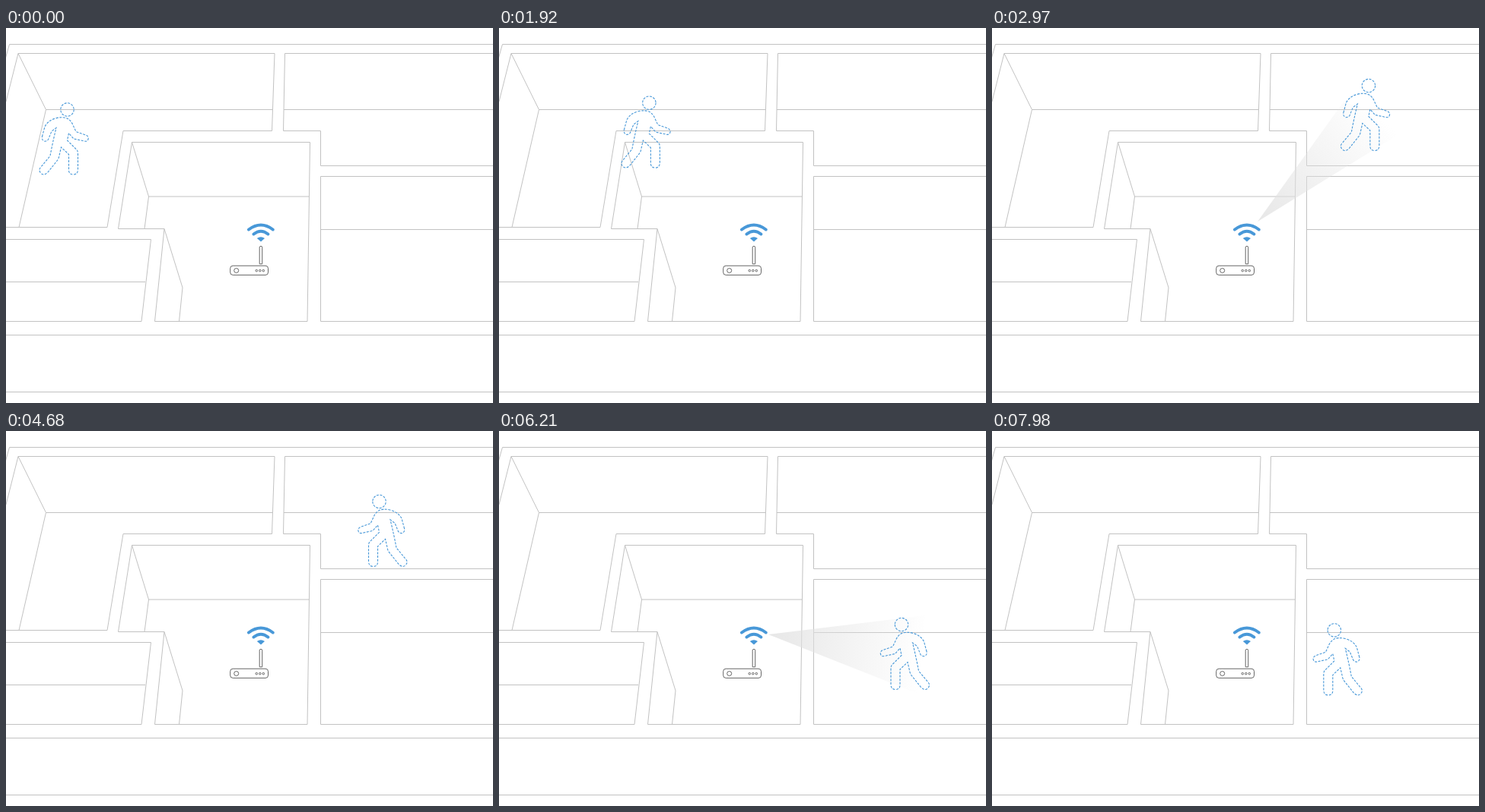
These frames come from a looping animation (640x494 px, 8 s). An HTML page:

```html
<!DOCTYPE html>
<html lang="en">
<head>
<meta charset="utf-8">
<title>Presence sensing through walls</title>
<style>
html, body { margin: 0; width: 100%; height: 100%; overflow: hidden; background: #fff; }
svg { display: block; width: 640px; height: 494px; fill: none; }
</style>
</head>
<body>
<svg viewBox="0 0 640 494">
  <!-- floor plan -->
  <path stroke="#c2c2c2" d="M-1 41 4.5 21.5H640
    M0 97 16 33.5H353L349.5 135.5H154L133 262.5H0
    M16 33.5 52.5 107.5H350.5 M52.5 107.5 17 262.5
    M640 33.5H366.5L364.5 135.5H413.5V181.5H640 M365 107.5H640
    M165.5 150.5H399.5L396 386.5H195.5L208 264.5H147.5Z
    M165.5 150.5 187.5 222H398.5 M187.5 222 182 264.5
    M208 264.5 232 342 227.5 386.5
    M640 195.5H413.5V386.5H640 M413.5 265.5H640
    M0 278.5H190.5L178 386.5H0 M0 334.5H183
    M0 404.5H640 M0 479.5H640"/>
  <g id="beams"></g>
  <!-- router -->
  <g stroke="#555" stroke-width=".9">
    <rect x="294.7" y="313.2" width="49.8" height="12.2" rx="3.5"/>
    <circle cx="302.7" cy="319.5" r="3"/>
    <circle cx="329.3" cy="319.6" r="1.3"/>
    <circle cx="333.8" cy="319.6" r="1.3"/>
    <circle cx="338.3" cy="319.6" r="1.3"/>
    <path d="M333.2 310.8V289.3Q333.2 287.4 335 287.4T336.7 289.3V310.8Z"/>
  </g>
  <!-- signal -->
  <g stroke="#4898d8" stroke-width="4" stroke-linecap="round">
    <path d="M319 265.5Q335 253.5 350.7 265.5M325.5 271.5Q335 264 344.3 271.5"/>
    <path fill="#4898d8" stroke="none" d="M329.8 277Q335 273.3 340 277L335 281.6Z"/>
  </g>
  <!-- walker, centred on x = 0 with the head at y = 0 -->
  <g id="walker" stroke="#4898d8" stroke-width="1.1" stroke-dasharray="3 1.6">
    <g transform="translate(-76.3 -107.5)">
      <circle cx="80.5" cy="107.5" r="8.7"/>
      <path d="M47.5 143 51 130Q55 122 65 119Q76 116 82 120Q86 123 88 128L92 136.5 105 141
        Q109 143 108 146.5Q107 150 103 149L89 146 82.5 138.5 80.5 148 93 160.5
        Q94.5 162 94.5 166V187Q94 193 88.5 193Q82.5 193 82.5 187V166.5L72.5 157 70 168
        Q69.5 172 67 175L55 190Q50 195 46 191.5Q42 187 46 183L58 168.5Q61 152 66 131.5
        L60 136 55.5 147Q53 150 50 149Q46.5 147 47.5 143Z"/>
    </g>
  </g>
</svg>
<script>
const LOOP = 8000, FADE = 150;
const walker = document.getElementById('walker');
const layer = document.getElementById('beams');

const stops = [[76.3, 107.5], [490.7, 76], [533.2, 255], [340.6, 273]];
const legs = [
  { start: 1350, span: 1500 },
  { start: 4395, span: 1265 },
  { start: 7070, span: 2000 }
];

// apex, two far corners, and the times when fading in and out begins
const beams = [
  { pts: [[316, 264], [80, 104], [46, 195]], on: 60, off: 1200 },
  { pts: [[349, 255], [462, 97], [554, 128]], on: 2820, off: 4260 },
  { pts: [[354, 268], [560, 243], [556, 348]], on: 6060, off: 7080 }
];

layer.innerHTML = beams.map(({ pts: [a, b, c] }, i) => `
  <linearGradient id="g${i}" gradientUnits="userSpaceOnUse"
    x1="${a[0]}" y1="${a[1]}" x2="${(b[0] + c[0]) / 2}" y2="${(b[1] + c[1]) / 2}">
    <stop stop-color="#e1e1e1" stop-opacity=".8"/>
    <stop offset="1" stop-color="#e1e1e1" stop-opacity="0"/>
  </linearGradient>
  <polygon points="${[a, b, c].join(' ')}" fill="url(#g${i})"/>`).join('');
const cones = layer.querySelectorAll('polygon');

const clamp = v => Math.max(0, Math.min(1, v));
const ease = u => u < .5 ? (2 * u) ** 2.1 / 2 : 1 - (2 - 2 * u) ** 2.1 / 2;

function draw(now) {
  const t = now % LOOP;
  let [x, y] = stops[0];
  legs.forEach(({ start, span }, i) => {
    const p = ease(clamp((t - start) / span));
    x += (stops[i + 1][0] - stops[i][0]) * p;
    y += (stops[i + 1][1] - stops[i][1]) * p;
  });
  const facing = t < legs[1].start ? 1 : -1;
  walker.setAttribute('transform', `translate(${x} ${y}) scale(${facing} 1)`);
  beams.forEach(({ on, off }, i) => {
    const o = Math.min(clamp((t - on) / FADE), clamp(1 - (t - off) / FADE));
    cones[i].setAttribute('opacity', o);
  });
  requestAnimationFrame(draw);
}
requestAnimationFrame(draw);
</script>
</body>
</html>
```
